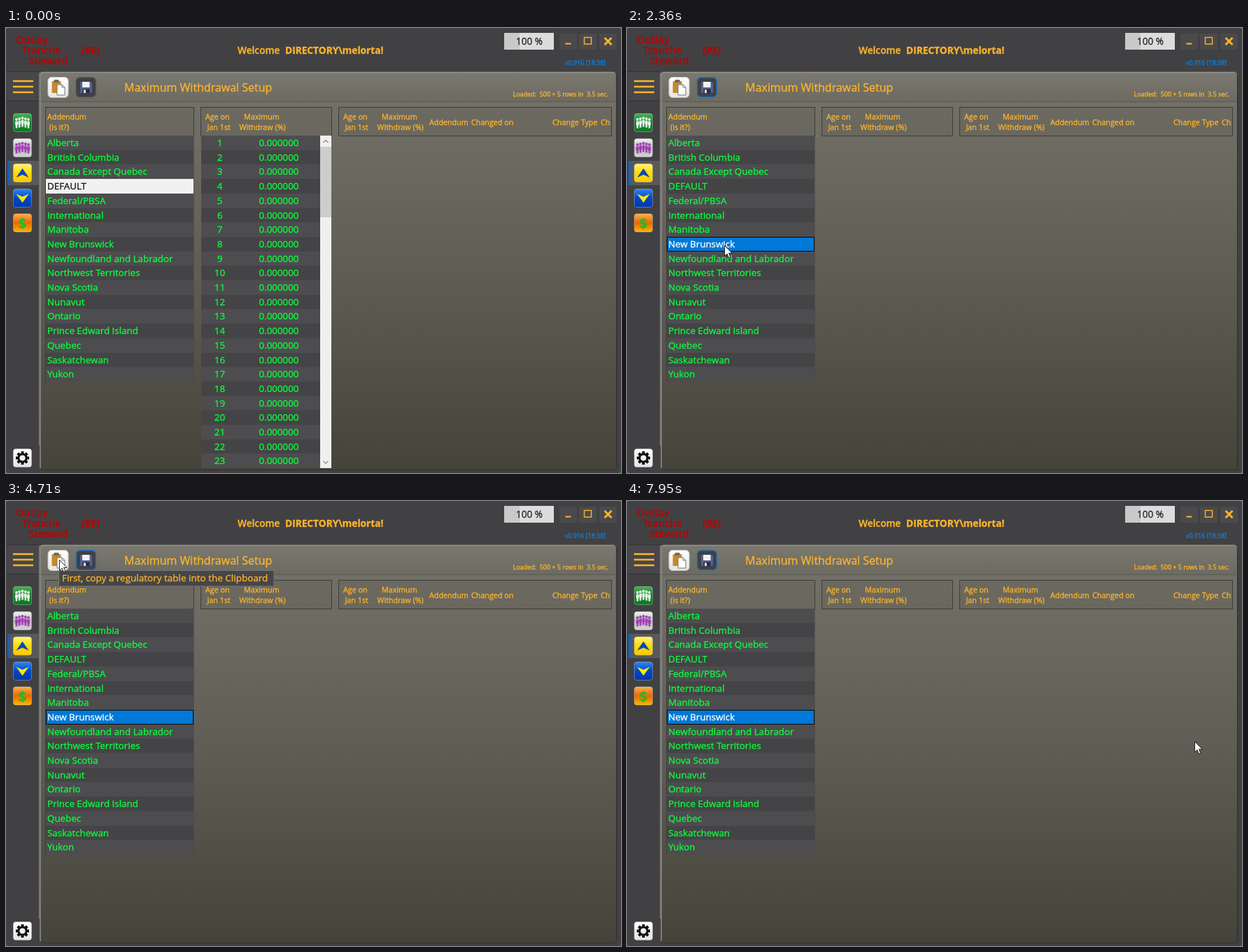
Recreate the animation shown at these times as an HTML page. Size 879 by 637 pixels, loop 8 s.

```html
<!DOCTYPE html>
<html lang="en">
<head>
<meta charset="utf-8">
<title>Maximum Withdrawal Setup</title>
<style>
html, body { margin: 0; width: 100%; height: 100%; overflow: hidden; background: #404042; }
svg { display: block; width: 879px; height: 637px; }
text { font-family: "Open Sans", "Noto Sans", sans-serif; white-space: pre;
  color: #ffb52b; fill: currentColor; stroke: currentColor; stroke-width: .3px; }
</style>
</head>
<body>
<svg id="stage" viewBox="0 0 879 637" xmlns="http://www.w3.org/2000/svg"></svg>
<script>
const ORANGE = '#ffb52b', GREEN = '#0cff3c', ROW = 20.7, TOP = 154;
const regions = ['Alberta', 'British Columbia', 'Canada Except Quebec', 'DEFAULT', 'Federal/PBSA',
  'International', 'Manitoba', 'New Brunswick', 'Newfoundland and Labrador', 'Northwest Territories',
  'Nova Scotia', 'Nunavut', 'Ontario', 'Prince Edward Island', 'Quebec', 'Saskatchewan', 'Yukon'];

const text = (x, y, size, str, attrs = '') =>
  `<text x="${x}" y="${y}" font-size="${size}" ${attrs}>${str}</text>`;
const rect = (x, y, w, h, fill, attrs = '') =>
  `<rect x="${x}" y="${y}" width="${w}" height="${h}" fill="${fill}" ${attrs}/>`;
const path = (d, stroke, width, attrs = '') =>
  `<path d="${d}" fill="none" stroke="${stroke}" stroke-width="${width}" ${attrs}/>`;
const gradient = (id, ...colors) => `<linearGradient id="${id}" x2="0" y2="1">` +
  colors.map((c, i) => `<stop offset="${i / (colors.length - 1)}" stop-color="${c}"/>`).join('') +
  '</linearGradient>';
const ink = color => `style="color:${color}"`;
const middle = 'text-anchor="middle"';

const rowTop = i => Math.round(TOP + i * ROW);
const rowBack = (i, x, w) => rect(x, rowTop(i), w, rowTop(i + 1) - rowTop(i), i % 2 ? '#444446' : '#4d4d50');
const rowText = (i, x, str, attrs) => text(x, rowTop(i) + 15.3, 13.35, str, attrs);
const header = (x, w) => rect(x + .5, 113.5, w, 41, '#68665c', 'fill-opacity=".6" stroke="#3d3d39"');
const label = (x, y, str) => text(x, y, 10.75, str);
const tile = (y, id, art) =>
  `<g transform="translate(10 ${y})">${rect(.5, .5, 26, 26, `url(#${id})`, 'rx="3.5" stroke="#ddd" stroke-opacity=".35"')}${art}</g>`;

function people(color) {
  return [5, 9.2, 13.5, 17.8, 22].map((x, i) => {
    const y = 9 - (i % 4 ? 1 : 0) - (i === 2 ? 1 : 0);
    return `<circle cx="${x}" cy="${y}" r="1.9" fill="${color}"/>` +
      rect(x - 1.9, y + 2.4, 3.8, 6, color, 'rx="1.2"') + rect(x - 1.3, y + 7, 2.6, 5.5, color);
  }).join('');
}

function gear() {
  const teeth = Array.from({ length: 8 }, (_, i) =>
    rect(11.5, 4, 4, 5, '#111', `transform="rotate(${i * 45} 13.5 13.5)"`)).join('');
  return teeth + '<circle cx="13.5" cy="13.5" r="5.6" fill="none" stroke="#111" stroke-width="3"/>';
}

const defs = '<defs>' +
  gradient('panel', '#74726a', '#6b695f', '#605e54', '#525047', '#45433a') +
  gradient('bar', '#7a786f', '#6c6a61') +
  gradient('green', '#4bb45c', '#128229', '#0d7a24') +
  gradient('silver', '#f2f2f2', '#b9b9b9', '#d4d4d4') +
  gradient('yellow', '#fff27a', '#ffdc00', '#ffc800') +
  gradient('blue', '#2f86f4', '#0046c8', '#0038ad') +
  gradient('amber', '#ffad4d', '#e86a00', '#ffb400') +
  gradient('white', '#fff', '#e4e4e4') +
  '<clipPath id="grid"><rect x="279" y="154" width="170" height="476"/></clipPath></defs>';

const frame = rect(0, 0, 879, 637, '#1d8b2b') + rect(0, 0, 879, 637, '#414143', 'rx="4"') +
  rect(1, 63, 46, 41, '#47474a') + path('M1 104.5H47', '#303032', 1) + path('M1 62.5H47', '#333335', 1) +
  rect(49, 63, 823, 569, 'url(#panel)', 'rx="4"') +
  rect(50, 64, 821, 41, 'url(#bar)', 'rx="3"') + path('M50 105.5H871', '#5a5951', 1) +
  path('M49 630V67Q49 63.5 53 63.5H869', '#96958f', 1.4) +
  path('M47.5 64V598', '#77777a', 1.2) + path('M51 632.5H869Q872.5 632.5 872.5 629V67', '#303030', 1.2);

const titleBar =
  [['Outlay', 14, 21.5], ['Tranche', 23, 37], ['Steward', 32, 52]].map(([s, x, y]) =>
    text(x, y, 14.4, s, `font-weight="600" ${ink('#b00808')}`)).join('') +
  text(108, 37, 14.2, '(BE)', `font-weight="700" font-style="italic" ${ink('#b00808')}`) +
  text(331, 37, 13.7, 'Welcome', 'font-weight="600"') +
  text(399, 37, 13.7, 'DIRECTORY\\melorta!', 'font-weight="700"') +
  rect(712, 7, 71, 24, '#dcdcdc') + rect(712, 7, 22, 24, '#c9c9c9') +
  text(748, 24, 13.6, '100 %', `${middle} ${ink('#222')}`) +
  [791, 819, 848].map(x => rect(x, 8, 25, 23, '#4a4a4c')).join('') +
  path('M799.5 22.5H807.5', ORANGE, 2) + rect(826.5, 13.5, 10, 9.5, 'none', `stroke="${ORANGE}" stroke-width="1.4"`) +
  path('M855.5 14L865.5 24M865.5 14L855.5 24', ORANGE, 2.8) +
  text(799, 53, 8.9, 'v0.916 [18:38]', ink('#0a80e8'));

const sideBar = path('M10 76H39M10 84H39M10 92H39', ORANGE, 2.6) +
  rect(2, 190, 45, 35, '#59595a') + rect(2, 190, 3.5, 35, '#1464b4') +
  tile(122, 'green', people('#e6f3e6')) + tile(158, 'silver', people('#a23cb4')) +
  tile(194, 'yellow', '<path d="M13.5 7L22.5 20L13.5 16L4.5 20Z" fill="#0846c0"/>') +
  tile(230, 'blue', '<path d="M13.5 20L22.5 7.5L13.5 11.5L4.5 7.5Z" fill="#ffe90a"/>') +
  tile(265.5, 'amber', text(13.5, 21, 20, '$', `${middle} font-weight="700" ${ink('#27b82c')}`)) +
  tile(602, 'white', gear());

const toolBar = rect(60, 70.5, 29, 29, 'url(#white)', 'rx="5" stroke="#c9c9c5"') +
  rect(65.5, 76, 13, 17, '#c58a28', 'rx="1.5"') + rect(68.5, 74, 7, 4, '#6b6b6b', 'rx="1"') +
  '<path d="M73 81H80L84 85V96H73Z" fill="#fff" stroke="#777"/><path d="M80 81V85H84" fill="none" stroke="#777"/>' +
  rect(100.5, 71, 27.5, 27.5, '#404044', 'id="save" rx="5" stroke="#4c4c4e" stroke-width="1.4"') +
  '<path d="M106 77H121L123 79V93H106Z" fill="#56618c"/>' + rect(109, 77, 10.5, 8, '#f1f1f6') +
  rect(109.5, 87.5, 10, 5.5, '#252b4a') + rect(111, 88.5, 3, 4.5, '#dfe3ee') +
  text(169, 91.3, 16, 'Maximum Withdrawal Setup') +
  text(724.5, 98, 8.98, 'Loaded:  500 + 5 rows in  3.5 sec.');

const headers = header(56, 212) + header(278, 187) + header(475, 390) +
  `<g id="addendum">${label(59, 131, 'Addendum')}${label(62, 146, '(is it?)')}</g>` +
  [285, 482].map(x => label(x, 131, 'Age on') + label(x + 2.5, 146, 'Jan 1st') +
    label(x + 55, 131, 'Maximum') + label(x + 48.5, 146, 'Withdraw (%)')).join('') +
  label(605, 138.6, 'Addendum') + label(665, 138.6, 'Changed on') +
  label(781, 138.6, 'Change Type') + label(850, 138.6, 'Ch');

const list = rect(56, TOP, 212.5, 352, '#414143') + regions.map((_, i) => rowBack(i, 57, 211)).join('') +
  rect(57, rowTop(3), 211, 21, '#f1f1f1', 'id="idle"') +
  rect(57.5, rowTop(7) + .5, 210, 20, '#0078d7', 'id="active" stroke="#0a0a0a"') +
  regions.map((name, i) => rowText(i, 59, name, `class="region" ${ink(GREEN)}`)).join('');

const ages = Array.from({ length: 23 }, (_, i) => rowBack(i, 279, 170) +
  rowText(i, 305.5, i + 1, `${middle} ${ink(GREEN)}`) +
  rowText(i, 390, '0.000000', `${middle} ${ink(GREEN)}`)).join('');
const grid = `<g id="ages"><g clip-path="url(#grid)">${ages}</g>` + rect(449, 154, 16, 476, '#f0f0f0') +
  rect(449, 170, 16, 101, '#cdcdcd') + path('M453.5 164L457 160.5L460.5 164M453.5 620L457 623.5L460.5 620', '#888', 1.2) + '</g>';

const tooltip = '<g id="tooltip">' + rect(75.5, 99.5, 307.5, 22.5, '#464648', 'stroke="#77777a"') +
  text(80, 115.3, 13.5, 'First, copy a regulatory table into the Clipboard') + '</g>';
const cursor = '<path id="cursor" d="M.5 .5V15.5L4 12.2L6.4 17.8L8.8 16.8L6.5 11.3H11.2Z" fill="#fff" stroke="#111" stroke-width=".9"/>';

document.getElementById('stage').innerHTML =
  defs + frame + titleBar + sideBar + toolBar + headers + list + grid + tooltip + cursor;

// Each move: first and last step time, step count, end point, optional curve control point.
const start = [208, 640];
const moves = [
  [500, 1290, 11, [141, 331], [150, 380]],
  [1350, 1600, 4, [139, 312]],
  [1900, 1900, 1, [139, 311]],
  [3510, 4310, 11, [80, 89], [137, 141]],
  [4370, 4460, 2, [76, 84]],
  [6880, 6880, 1, [77, 85]],
  [7110, 7870, 11, [808, 345], [600, 380]],
  [7950, 7950, 1, [811, 344]]
];

function cursorAt(time) {
  let from = start;
  for (const [t0, t1, steps, to, via] of moves) {
    if (time < t0) break;
    if (time >= t1) { from = to; continue; }
    const u = (Math.floor((time - t0) / (t1 - t0) * (steps - 1)) + 1) / steps;
    const e = u * u * (3 - 2 * u);
    return from.map((a, i) => {
      const c = via ? via[i] : (a + to[i]) / 2;
      return Math.round((1 - e) ** 2 * a + 2 * e * (1 - e) * c + e * e * to[i]);
    });
  }
  return from;
}

const $ = id => document.getElementById(id);
const show = (id, on) => $(id).setAttribute('visibility', on ? 'visible' : 'hidden');
const names = document.querySelectorAll('.region');

function draw(now) {
  const time = now % 8000, chosen = time >= 2360;
  const [x, y] = cursorAt(time);
  const overHeader = x >= 56 && x < 268 && y >= 111 && y < 154;
  show('cursor', time >= 500);
  $('cursor').setAttribute('transform', `translate(${x} ${y})`);
  show('idle', !chosen);
  show('active', chosen);
  show('ages', !chosen);
  show('tooltip', time >= 4710 && time < 7110);
  names[3].style.color = chosen ? GREEN : '#111';
  names[7].style.color = chosen ? '#fff' : GREEN;
  $('save').setAttribute('stroke', chosen ? '#1769b8' : '#4c4c4e');
  $('addendum').setAttribute('font-weight', overHeader ? 600 : 400);
  requestAnimationFrame(draw);
}
requestAnimationFrame(draw);
</script>
</body>
</html>
```
